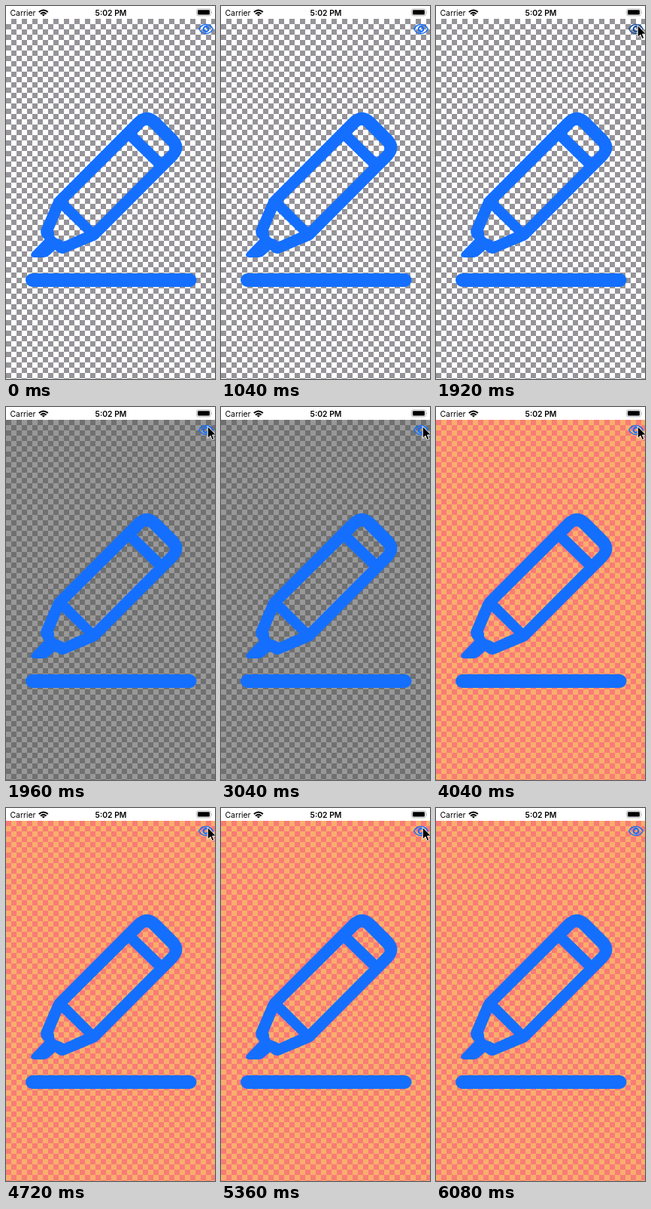
Recreate the animation shown at these times as an HTML page. Size 278 by 494 pixels, loop 6120 ms.

```html
<!DOCTYPE html>
<html lang="en">
<head>
<meta charset="utf-8">
<style>
  html, body { margin: 0; height: 100%; overflow: hidden; background: #fff; }
  svg { display: block; width: 278px; height: 494px; }
  text { font-family: Inter, sans-serif; font-size: 10.4px; }
</style>
</head>
<body>
<svg viewBox="0 0 278 494">
  <defs>
    <pattern id="checks" width="14" height="14" y="17" patternUnits="userSpaceOnUse">
      <rect id="even" width="14" height="14"/>
      <path id="odd" d="M7 0h7v7H0v7h7z"/>
    </pattern>
  </defs>
  <rect y="17" width="278" height="477" fill="url(#checks)"/>

  <!-- status bar -->
  <text x="5.5" y="12.8">Carrier</text>
  <g fill="none" stroke="#000" stroke-width="2">
    <path d="M43.8 8q6-5 12 0M46 10.4q3.8-3.1 7.6 0"/>
    <path d="M47.7 11.5q2.1-1.5 4.2 0l-2.1 2.1z" fill="#000" stroke="none"/>
  </g>
  <text x="139.5" y="12.8" text-anchor="middle" font-weight="600">5:02 PM</text>
  <rect x="253.4" y="3.9" width="19" height="9" rx="2.4" fill="none" stroke="#aaa" stroke-width=".8"/>
  <rect x="254.9" y="5.3" width="16" height="6.2" rx="1.3"/>
  <path d="M273.4 6.9q1.5 1.5 0 3z" fill="#aaa"/>

  <!-- highlighter with its line -->
  <g fill="#146fff">
    <path fill-rule="evenodd" d="M66.5 253L170 149.5Q187 132.5 204 148.5L227 171.5Q242 187 227 203.5L123.5 307Q121.5 309.5 118.5 310.5L79 327Q72 330 65.5 323L57.5 330Q54.5 333 50.5 333H37Q31 332 34 327L51.5 309Q44.5 303 46.5 296L63.5 257Q64.5 255 66.5 253Z
      M174 169L207 201L216 192Q219 189 216 185L191 160Q187 156 183 160Z
      M163 179L197 212L116 293L82 259Z
      M74 271L63 297Q64 299 64 303Q64 306 68 308Q73 309 77 312L104 300Z"/>
    <rect x="26" y="354" width="227.5" height="18" rx="9"/>
  </g>

  <g id="eye" fill="none" stroke-width="1.5">
    <path d="M256.7 30.5C261 22.5 271 22.5 275.3 30.5C271 38.5 261 38.5 256.7 30.5Z"/>
    <circle cx="266" cy="30.5" r="3.3" stroke-width="2.2"/>
  </g>
  <path id="cursor" d="M0 0V16L3.7 12.5L6 18L8.6 16.9L6.3 11.6H11.3Z" stroke="#fff" stroke-width="1"/>
</svg>
<script>
const LOOP = 6120;
const themes = [
  { from: 0, even: '#fff', odd: '#969499' },
  { from: 1960, even: '#707070', odd: '#989898' },
  { from: 4040, even: '#f97b76', odd: '#f9ae6c' }
];
const taps = [[1880, 1960], [3960, 4040]];
const el = id => document.getElementById(id);
const ease = (t, a, b) => {
  const p = Math.min(1, Math.max(0, (t - a) / (b - a)));
  return p * p * (3 - 2 * p);
};

function draw(now) {
  const t = now % LOOP;
  const theme = themes.filter(s => t >= s.from).pop();
  el('even').setAttribute('fill', theme.even);
  el('odd').setAttribute('fill', theme.odd);

  const pressed = taps.some(([a, b]) => t >= a && t < b);
  el('eye').setAttribute('stroke', pressed ? '#164c9c' : '#146fff');

  // the pointer slides in from the right edge and leaves the same way
  const away = 1 - ease(t, 1520, 1720) + ease(t, 5560, 5760);
  el('cursor').setAttribute('transform', `translate(${268.2 + 14 * away} ${25.5 + 8 * away})`);
  requestAnimationFrame(draw);
}
requestAnimationFrame(draw);
</script>
</body>
</html>
```
